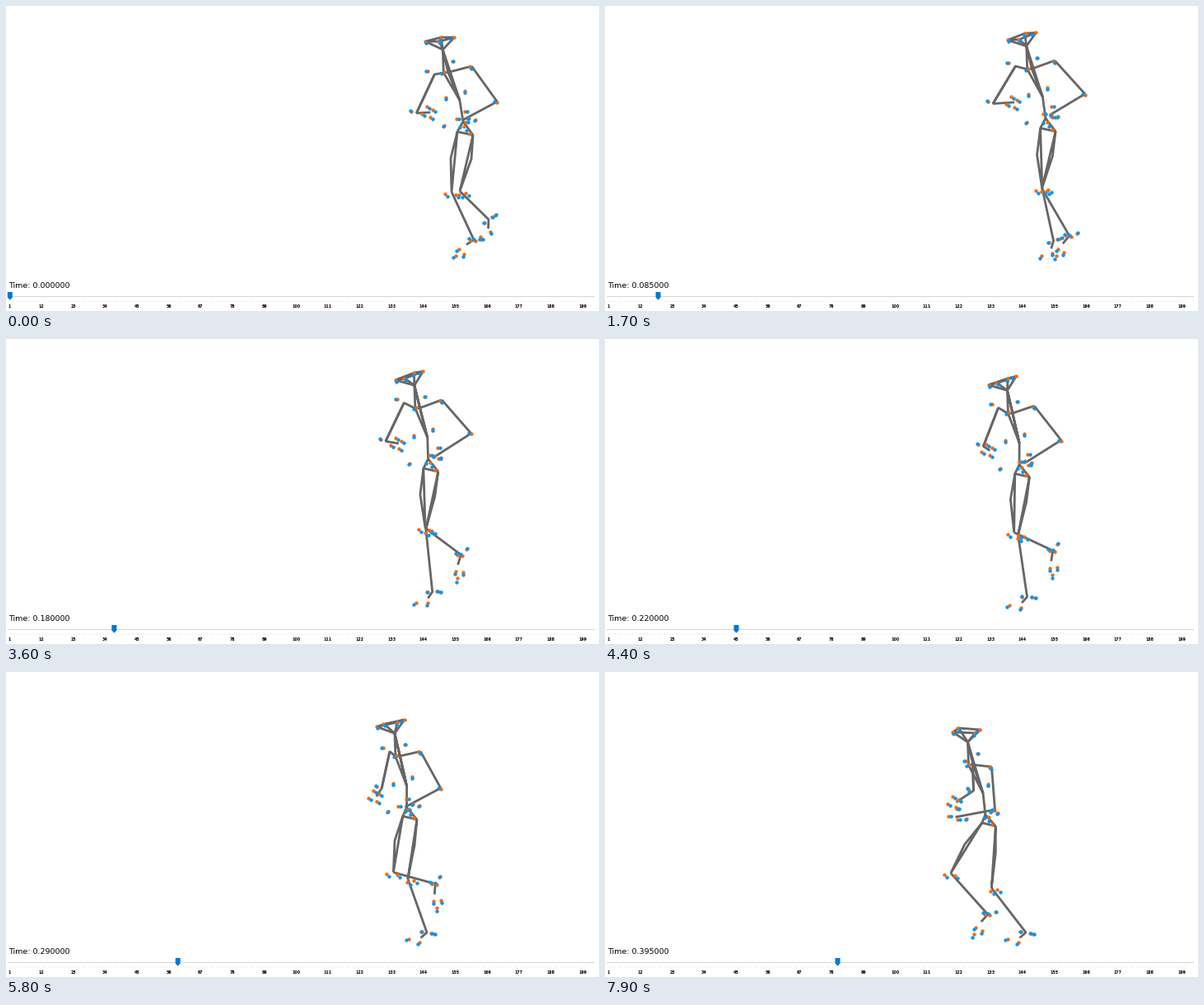
A matplotlib script for the animation above (8000 ms loop, 720 by 370 pixels).

```python
import numpy as np
import matplotlib.pyplot as plt
from matplotlib.animation import FuncAnimation
from matplotlib.collections import LineCollection

W, H, DPI = 720, 370, 100
FRAMES, INTERVAL = 80, 100
PX = 72 / DPI
GRAY, ORANGE, BLUE = "#666666", "#ff6600", "#0095f8"

k = np.arange(FRAMES)
u = k / (FRAMES - 1)


def path(x, y):
    return np.stack(np.broadcast_arrays(x, y, k)[:2], axis=1)


def swing(*points):
    """Smooth curve through evenly spaced points over the loop."""
    n = len(points)
    coef = np.polyfit(np.linspace(0, 1, n), np.array(points, float), n - 1)
    return np.vander(u, n) @ coef


# The pelvis moves at a steady pace and bobs; the trunk sways above it
bob = np.cos(2 * np.pi * (k - 14) / 130)
sway = -np.cos(2 * np.pi * (k - 5) / 92)
pelvis = path(555 - 1.18 * k, 154.5 - 18.5 * bob)
# The right foot comes down and stays planted
fall = 1 - np.minimum(u / 0.65, 1)
ankle = path(511 + 75 * fall ** 2, 316 - 57 * fall ** 1.5)

pos = {
    "pelvis": pelvis,
    "spine": pelvis + path(-2 + 2.3 * sway, -26),
    "neck": pelvis + path(-19.5 + 5.5 * sway, -88.5 - 1.5 * sway),
    "r_ankle": ankle,
    "r_toe": ankle + path(-7.5 + 7 * fall, 6.5 + 4.5 * fall),
}

# Joint, parent, then the offset as it swings from start to end
CHAIN = [
    ("front", "neck", (-21, -10), (-23, -6.5), (-18, -12)),
    ("far", "neck", (-2, -15), (0, -15), (9, -11)),
    ("back", "neck", (14, -15), (10.5, -17), (15, -15)),
    ("near", "neck", (-4, -10), (-12, -8.5), (-11, -17)),
    ("chest", "neck", (1, 28)),
    ("upper", "neck", (6.5, 27.5)),
    ("l_shoulder", "neck", (-10, 30), (-12, 21), (6, 27)),
    ("l_elbow", "l_shoulder", (-22, 47), (-26, 46), (-13, 46), (1, 32)),
    ("l_wrist", "l_elbow", (17, -1), (23, 0), (-1, 8), (-21, 14)),
    ("r_shoulder", "neck", (35, 20), (33, 18), (29, 30)),
    ("r_elbow", "r_shoulder", (31, 43), (34.5, 41), (4, 52)),
    ("r_wrist", "r_elbow", (-41, 22), (-43, 27), (-43, 25), (-48, 9)),
    ("l_hip", "pelvis", (-7, 12.5), (-4, 10)),
    ("l_thigh", "l_hip", (-8, 32), (-4.5, 31.5), (-21, 26)),
    ("l_knee", "l_hip", (-7, 73), (1, 72), (-38, 61)),
    ("l_ankle", "l_knee", (27, 58), (38, 46), (50, 15), (45, 50)),
    ("l_toe", "l_ankle", (-9, 6), (-6, 11), (-1, 13), (-8, 9)),
    ("r_hip", "pelvis", (12, 16.5), (12.5, 14)),
    ("r_thigh", "r_hip", (-2, 29), (-4, 30.5), (0, 32)),
    ("r_knee", "r_hip", (-16, 68), (-14.5, 70), (-5, 75)),
]
for joint, parent, *offsets in CHAIN:
    pos[joint] = pos[parent] + swing(*offsets)

BONES = [b.split() for b in (
    "front far back near front", "front neck back", "far neck near",
    "neck chest spine neck upper spine pelvis",
    "l_elbow l_shoulder chest upper r_shoulder",
    "l_shoulder l_elbow l_wrist", "r_shoulder r_elbow r_wrist",
    "pelvis l_hip r_hip pelvis",
    "l_hip l_thigh l_knee l_hip", "r_hip r_thigh r_knee r_hip",
    "l_knee l_ankle l_toe", "r_knee r_ankle r_toe",
)]

# Joint: shift from orange to blue, then orange offsets from the joint
MARKERS = {
    "front": [(1, 2), (0, 0)],
    "far": [(-1, 3), (0, 0)],
    "back": [(-4, 3), (0, 0)],
    "near": [(2, 2), (-1, 0)],
    "neck": [(1, 0), (12, 14)],
    "chest": [(-3, 2), (1, -1)],
    "l_shoulder": [(-2, 0), (-8, -4)],
    "r_shoulder": [(2, 2), (-2, 1)],
    "spine": [(0, 2), (6, -11), (-17, -3)],
    "l_elbow": [(-1, -1), (-6, -2)],
    "l_wrist": [(3, 2), (-4, -7), (3, -3), (-10, 2), (0, 6)],
    "r_elbow": [(-3, -1), (0, 1)],
    "r_wrist": [(3, 0), (2, -10), (-8, -1), (3, 3)],
    "pelvis": [(-1, 1), (-23, 5), (7, -4), (15, -2)],
    "l_hip": [(-5, 1), (8, -7)],
    "r_hip": [(-4, -4), (-4, -2)],
    "l_knee": [(3, 3), (-8, 2), (5, 3)],
    "r_knee": [(4, 3), (-1, 4), (7, 2)],
    "l_ankle": [(-2, -2), (-4, 0), (2, 1)],
}
# Offsets from the ankle that turn with the foot; blue sits further out
FEET = {
    "l": [(9, -2), (-16, 14), (-9, 19), (-19, 22)],
    "r": [(-6, -1), (5, 1), (9, 2), (-22, 8), (-9, 12)],
}
FLAT, OUT = np.radians(138), 1.15

orange_pos, blue_pos = [], []
for joint, (shift, *offsets) in MARKERS.items():
    for off in offsets:
        orange_pos.append(pos[joint] + off)
        blue_pos.append(orange_pos[-1] + shift)
for side, offsets in FEET.items():
    heel = pos[side + "_ankle"]
    dx, dy = (pos[side + "_toe"] - heel).T
    turn = np.arctan2(dy, dx) - FLAT
    c, s = np.cos(turn), np.sin(turn)
    for x, y in offsets:
        off = path(c * x - s * y, s * x + c * y)
        orange_pos.append(heel + off)
        blue_pos.append(heel + OUT * off)


fig = plt.figure(figsize=(W / DPI, H / DPI), dpi=DPI, facecolor="white")
ax = fig.add_axes([0, 0, 1, 1])
ax.set_xlim(0, W)
ax.set_ylim(H, 0)
ax.axis("off")

# Timeline
STEP = 3.515
ax.plot([2, 714], [351.5, 351.5], color="#d6d6d6", lw=PX, zorder=1)
ax.vlines(np.round(4 + STEP * np.arange(200)) + 0.5, 357, 358.2, color="#dcdcdc", lw=PX, zorder=1)
for n in range(1, 200, 11):
    ax.text(4.2 + STEP * (n - 1), 366.5, str(n), ha="center", va="baseline",
            family="DejaVu Sans", weight="bold", size=4.8 * PX, color="black")
THUMB = np.array([(-3, 347), (3, 347), (3, 353.5), (0, 356.7), (-3, 353.5)])
thumb = ax.fill(*THUMB.T, color="#0078d7", lw=0, zorder=3)[0]
clock = ax.text(3.5, 342, "", va="baseline", family="DejaVu Sans", size=9.5 * PX, color="black")

body = LineCollection([], colors=GRAY, linewidths=2.8 * PX, capstyle="butt", joinstyle="bevel", zorder=4)
ax.add_collection(body, autolim=False)
dot = dict(s=(4.4 * PX) ** 2, linewidths=0)
orange = ax.scatter([], [], color=ORANGE, zorder=5, **dot)
blue = ax.scatter([], [], color=BLUE, zorder=6, **dot)


def draw(i):
    body.set_segments([[pos[j][i] for j in bone] for bone in BONES])
    orange.set_offsets([p[i] for p in orange_pos])
    blue.set_offsets([p[i] for p in blue_pos])
    thumb.set_xy(THUMB + (4.8 + STEP * i, 0))
    clock.set_text(f"Time: {i * 0.005:.6f}")
    return body, orange, blue, thumb, clock


anim = FuncAnimation(fig, draw, frames=FRAMES, interval=INTERVAL, repeat=True, repeat_delay=0)
plt.show()
```
